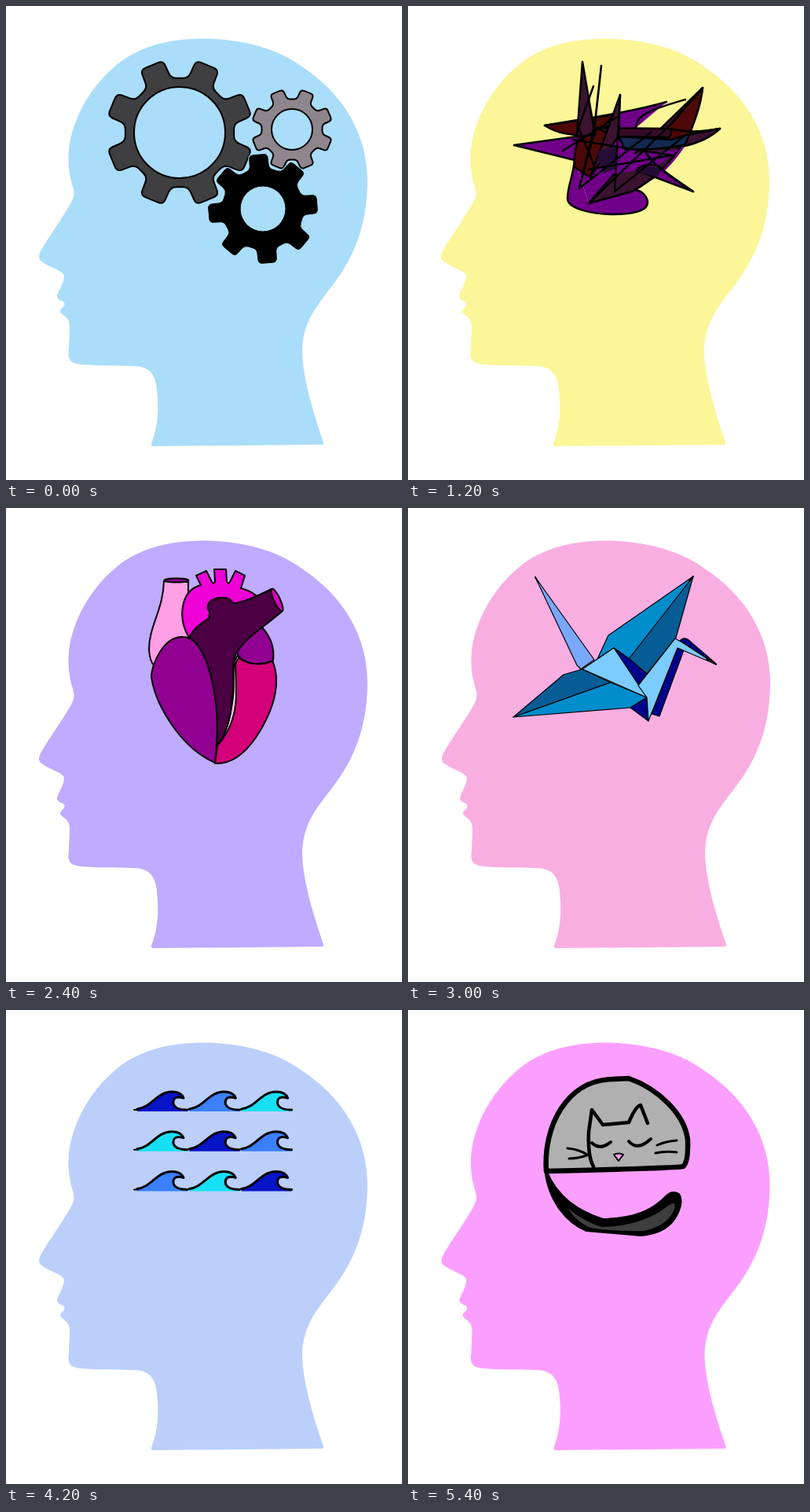
Animation, 504 px wide and 603 px high, one loop 6000 ms. Source, as an HTML page:

```html
<!DOCTYPE html>
<html lang="en">
<head>
<meta charset="utf-8">
<title>Thoughts</title>
<style>
html, body { margin: 0; width: 100%; height: 100%; overflow: hidden; background: #fff; }
svg { display: block; width: 100%; height: 100%; }
</style>
</head>
<body>
<svg viewBox="0 0 504 603" stroke-linejoin="round" stroke-linecap="round">
  <path id="head" d="M250 41.5C303 42 346 55 375 76C429 111 460 163 460 222C460 281 441 323 415 356C396 381 378 401 377 438C377 470 390 515 404 555Q405 558 402 558L188 560Q183 560 186 554C192 538 194 520 193 500C192 478 190 458 162 458C140 457 115 458 96 456C80 455 78 448 80 436L81 410C82 395 72 395 69 389Q68 387 73 383Q76 379 73 376Q65 374 65 369C67 361 74 352 74 343C72 336 55 333 44 324Q40 320 44 312C55 292 75 266 85 246Q88 239 85 230C79 210 79 195 80 182C85 140 110 102 135 80C165 52 205 42 250 41.5Z"/>
  <g id="thought"></g>
</svg>
<script>
const HOLD = 600;
const head = document.getElementById('head');
const thought = document.getElementById('thought');

const shape = (d, fill = 'none', width = 2, stroke = '#000') =>
  `<path d="${d}" fill="${fill}" stroke="${stroke}" stroke-width="${width}"/>`;

// Closed polygon whose corners are rounded by r.
function rounded(points, r) {
  const toward = (a, b) => {
    const t = r / Math.hypot(b[0] - a[0], b[1] - a[1]);
    return [a[0] + (b[0] - a[0]) * t, a[1] + (b[1] - a[1]) * t];
  };
  return points.map((p, i) => {
    const prev = points[(i + points.length - 1) % points.length];
    const next = points[(i + 1) % points.length];
    return `${i ? 'L' : 'M'}${toward(p, prev)}Q${p} ${toward(p, next)}`;
  }).join('') + 'Z';
}

function gearPath(cx, cy, tip, root, hole, offset, corner) {
  const points = [];
  for (let tooth = 0; tooth < 8; tooth++) {
    for (const [da, r] of [[-13.5, root], [-9.5, tip], [9.5, tip], [13.5, root]]) {
      const a = (offset + tooth * 45 + da) * Math.PI / 180;
      points.push([cx + r * Math.cos(a), cy + r * Math.sin(a)]);
    }
  }
  return rounded(points, corner) +
    `M${cx - hole} ${cy}a${hole} ${hole} 0 1 0 ${2 * hole} 0a${hole} ${hole} 0 1 0 ${-2 * hole} 0Z`;
}

function gears(bg) {
  const gear = (d, fill, width, stroke) =>
    `<g fill-rule="evenodd">${shape(d, fill, width, stroke)}</g>`;
  const black = gearPath(327, 258, 70, 52, 29, -5, 5);
  return gear(gearPath(221, 161, 94, 70, 58, 22.5, 7), '#3f3e41') +
    gear(gearPath(364, 157, 52, 39, 26, 22.5, 4), '#8e868c') +
    gear(black, '#000', 3, bg) + gear(black, '#000', 1);
}

function bulb() {
  const rays = 'M263 76V100M191 102L206 121M335 101L320 120M155 172L179 179M372 172L349 179M170 242L193 234M336 233L358 241';
  const ring = y => `<rect x="237" y="${y}" width="54" height="9" rx="4.5" fill="#a0a5a1" stroke="#000" stroke-width="2"/>`;
  return shape(rays, 'none', 2.4, '#fff') +
    shape('M264 116C303 116 333 148 333 186C333 225 302 238 302 278Q298 296 280 296H247Q226 296 226 278C224 240 195 225 195 186C195 148 225 116 264 116Z', '#f7f2cf') +
    shape('M237 198H291C278 215 274 240 277 296H252C254 245 250 220 237 198Z', '#ff0') +
    shape('M240 199C236 193 232 188 233 184Q236 181 239 187Q243 196 246 191Q248 185 252 191Q255 196 258 190Q260 185 263 191Q266 196 269 190Q271 185 275 191Q278 196 281 190Q283 185 287 190Q289 192 291 185Q296 178 296 188Q294 195 290 198Z', '#fcb448') +
    ring(300) + ring(313) +
    shape('M245 326H281Q286 328 284 332Q280 335 276 336Q270 344 264 344Q258 344 252 336Q243 334 242 330Q242 326 245 326Z', '#a0a5a1');
}

function tangle() {
  const purple = '#710089', maroon = '#4d0808', plum = '#3b1230', navy = '#14294f', ink = '#250d35';
  const line = (d, fill) => shape(d, fill, 2.5);
  const area = (d, fill) => shape(d, fill, 0);
  return area('M135 177L222 165L290 155H336L358 165L352 179C338 200 325 212 318 217L285 236L230 251L212 196Z', purple) +
    line('M212 196C210 217 203 230 203 245C203 258 235 265 262 265C285 265 305 261 305 250C305 243 298 235 290 234L230 251', purple) +
    line('M222 165L135 177L212 196') +
    line('M329 122C305 134 275 147 240 164L174 152C225 143 280 136 329 122Z', purple) +
    line('M174 152C205 148 235 143 262 138L240 164C205 166 188 161 174 152Z', maroon) +
    area('M329 122L290 155L240 158Z', purple) +
    line('M212 205C211 185 214 172 222 163L262 150L240 205L232 218Z', maroon) +
    line('M375 104C370 145 343 205 285 236L230 251L262 214Z', plum) +
    area('M262 190L345 183L318 203L291 209L262 214Z', purple) +
    line('M375 104C372 129 364 150 352 178L310 178Z', maroon) +
    line('M363 236L291 209Q300 199 318 203L330 213Z', purple) +
    area('M297 206Q310 200 322 208L318 217Q300 215 291 209Z', ink) +
    line('M353 119C315 130 290 137 290 155C294 185 315 207 363 236') +
    line('M397 156C370 178 325 184 276 182L268 166L335 170L365 161Z', navy) +
    line('M397 156L358 164L352 178Q380 172 397 156Z', plum) +
    line('M240 155L333 156Q338 160 332 167L262 166Z', '#350b27') +
    line('M397 156Q360 163 333 156') +
    line('M222 71L215 166L238 164Z', plum) +
    line('M246 76L236 165L218 232L238 150Z', maroon) +
    line('M270 113L268 165L232 218Z', plum) +
    area('M240 185L266 178V206L248 213Z', ink) +
    line('M270 113L263 236L352 165M236 102L217 155L238 205M197 184L265 142M210 170L336 190L230 208M218 232L310 160M375 104L335 150L230 251');
}

function heart() {
  const purple = '#910091';
  const rim = (x, y, rx, ry, turn, fill) =>
    `<ellipse cx="${x}" cy="${y}" rx="${rx}" ry="${ry}" transform="rotate(${turn} ${x} ${y})" fill="${fill}" stroke="#000" stroke-width="2"/>`;
  return shape('M201 93C200 130 182 150 182 180Q183 195 188 200L232 165V94Z', '#ff9fe5') +
    rim(217, 92, 15.5, 2.6, 0, purple) +
    shape('M233 165C218 140 222 105 248 98L242 86L255 80L262 94Q264 97 266 94L265 78H280L281 94Q283 97 285 94L292 80L304 86L299 102Q310 105 318 111L289 145L259 140Z', '#ee00d6') +
    shape('M296 186C285 200 292 215 289 240Q284 285 268 302L285 285L297 240Z', '#ffc4f0') +
    shape('M233 165C240 152 248 147 259 140C257 136 262 133 257 129C255 119 264 114 275 114Q285 113 289 121Q300 122 338 103L352 131C330 150 312 160 296 180C285 195 292 210 288 240Q285 285 268 302C265 250 262 180 233 165Z', '#4a0042') +
    rim(345, 117, 4, 15.5, -25, '#d900c0') +
    shape('M292 200Q295 187 300 193C310 200 328 200 339 194C352 225 338 262 318 292C300 318 283 326 266 325L269 302C285 285 292 262 293 240Q293 220 292 200Z', '#d4007a') +
    shape('M294 184C300 172 315 160 326 152C336 163 342 178 340 194C325 201 300 200 294 184Z', purple) +
    shape('M225 164C200 163 185 200 185 215C190 250 222 305 266 324C272 270 268 235 256 198C247 175 238 164 225 164Z', purple);
}

function crane() {
  const dark = '#065c94', mid = '#008dcc', light = '#7cccff', navy = '#00008c';
  return [
    ['162 88L237 193L220 205L215 200', '#7aa8ff'],
    ['363 87L255 162L241 192L262 178L283 193', mid],
    ['363 87L341 165L304 211L281 192', dark],
    ['134 266L198 212L222 205L258 222', dark],
    ['134 266L258 222L304 241L283 254', mid],
    ['262 178L283 193L304 211L292 226', navy],
    ['283 254L304 241L306 271', navy],
    ['222 205L262 178L304 241', light],
    ['346 169Q350 164 356 167L392 198', navy],
    ['343 178L351 181L320 265L310 262', navy],
    ['340 166L349 171L392 199L343 178L306 271L304 241L293 226', light],
  ].map(([d, fill]) => shape(`M${d}Z`, fill, 1.2)).join('') +
    shape('M162 88L166 95M363 87L358 93M392 199L380 192', 'none', 2);
}

function waves() {
  const colors = ['#0714c8', '#3a80ff', '#18e0f4'];
  const crest = 'M5 126C23 124 30 104 49 104Q61 104 64 112Q50 108 51 119Q53 127 69 127';
  let out = '';
  for (let row = 0; row < 3; row++) {
    for (let col = 0; col < 3; col++) {
      const fill = colors[(col - row + 3) % 3];
      out += `<g transform="translate(${162 + col * 66.3} ${row * 50.7})">` +
        shape(crest + 'V129H5Z', fill, 0) + shape(crest, 'none', 3) + '</g>';
    }
    const y = 127 + row * 50.7;
    out += shape(`M163 ${y}h5M357 ${y}h5`, 'none', 2);
  }
  return out;
}

function cat() {
  return shape('M176 205C172 148 202 89 260 88L281 87C318 100 352 132 356 165Q357 194 350 199Q345 201 176 205Z', '#b0b0b0', 6.5) +
    shape('M236 199C228 185 230 160 230 155L234 127L248 146L281 143Q290 122 296 121L305 144', 'none', 4.5) +
    shape('M234 169Q244 179 258 168M281 167Q292 180 309 164', 'none', 4) +
    shape('M203 176Q217 177 228 184M205 189Q217 189 230 184M317 172Q328 167 342 166M315 182Q328 179 342 181', 'none', 3) +
    shape('M262 184Q268 181 274 184L268 192Z', '#ff9cf0', 2) +
    shape('M176 204C190 238 215 255 248 266C290 265 312 254 328 237Q336 229 345 234Q352 245 340 265C330 280 315 285 297 287L227 281C200 270 177 240 174 200Z', '#000', 2) +
    shape('M203 252Q225 270 247 276Q290 275 320 257Q335 245 339 246Q342 252 332 265Q320 277 300 281Q262 282 232 277Q215 270 203 252Z', '#3e3e3e', 0);
}

const scenes = [
  ['#aaddf9', gears],
  ['#debbfc', bulb],
  ['#fbf697', tangle],
  ['#bfabff', heart],
  ['#f9aee2', crane, 1],
  ['#bbcffa', waves],
  ['#fb9fff', cat, 0.5],
].map(([color, draw, shift = 0]) => ({ color, shift, art: draw(color) }));

const order = [0, 1, 2, 3, 3, 4, 4, 5, 5, 6];
let shown = -1;

function tick() {
  const index = order[Math.floor(performance.now() / HOLD) % order.length];
  if (index !== shown) {
    const { color, shift, art } = scenes[index];
    head.setAttribute('fill', color);
    head.setAttribute('transform', `translate(${shift} 0)`);
    thought.innerHTML = art;
    shown = index;
  }
  requestAnimationFrame(tick);
}
tick();
</script>
</body>
</html>
```
